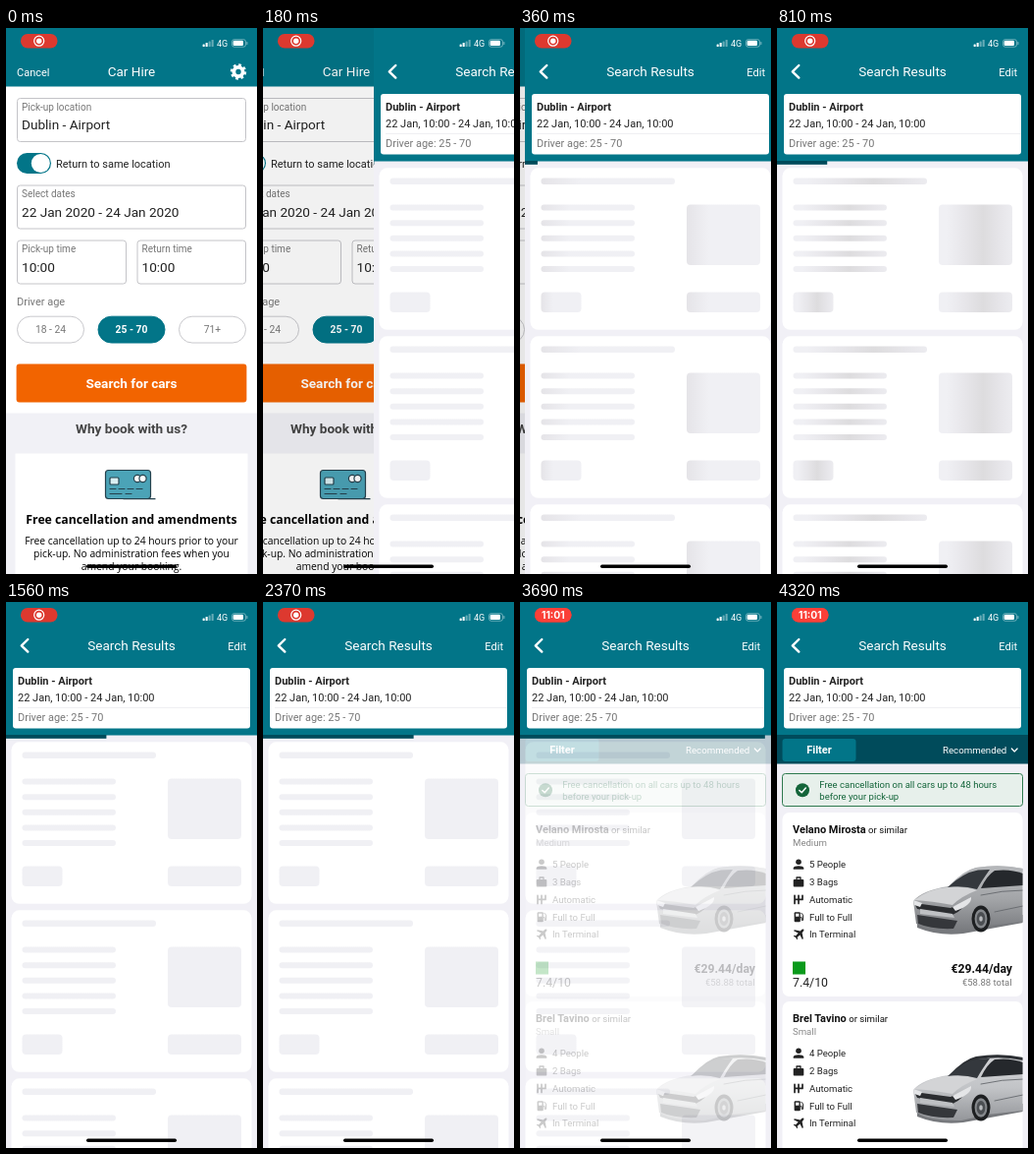
An HTML page for the animation above (4.35 s loop, 256x555 px).

```html
<!DOCTYPE html>
<html lang="en">
<head>
<meta charset="utf-8">
<title>Car hire search</title>
<style>
  html, body { margin: 0; width: 100%; height: 100%; overflow: hidden; background: #fff; }
  svg { display: block; width: 256px; height: 555px; }
  text { font-family: Roboto, Arial, sans-serif; white-space: pre; }
  .web { font-family: "Open Sans", "Noto Sans", sans-serif; }
  .clock { font-family: Inter, Arial, sans-serif; }
</style>
</head>
<body>
<svg id="stage" viewBox="0 0 256 555" xmlns="http://www.w3.org/2000/svg"></svg>
<script>
const LOOP = 4350;
const TEAL = '#027588', DEEP = '#004b5b', PAGE = '#f1f0f6', INK = '#222', GREY = '#777';

const rect = (x, y, w, h, fill, r = 0, more = '') =>
  `<rect x="${x}" y="${y}" width="${w}" height="${h}" rx="${r}" fill="${fill}" ${more}/>`;
const path = (d, fill, more = '') => `<path d="${d}" fill="${fill}" ${more}/>`;
const circle = (x, y, r, fill, more = '') =>
  `<circle cx="${x}" cy="${y}" r="${r}" fill="${fill}" ${more}/>`;
const line = (d, stroke, w) =>
  path(d, 'none', `stroke="${stroke}" stroke-width="${w}" stroke-linecap="round" stroke-linejoin="round"`);
const gradient = (id, stops, more = '') =>
  `<linearGradient id="${id}" ${more}>` +
  stops.map(([at, c]) => `<stop offset="${at}" stop-color="${c}"/>`).join('') + '</linearGradient>';

// y is the middle of the capitals
const text = (x, y, str, size, fill = INK, { bold, at = 'start', cls = '' } = {}) =>
  `<text x="${x}" y="${(y + size * 0.355).toFixed(2)}" font-size="${size}" fill="${fill}" class="${cls}"` +
  ` font-weight="${bold ? 700 : 400}" text-anchor="${at}">${str}</text>`;
const MID = { at: 'middle' }, BOLD = { bold: true }, MIDBOLD = { at: 'middle', bold: true };

function field(x, y, w, label, value) {
  return rect(x + .5, y + .5, w - 1, 44, '#fff', 3, 'stroke="#c4c4c8"') +
    text(x + 5, y + 9.3, label, 10, GREY) + text(x + 5, y + 27.5, value, 13.6);
}

function pill(x, label, on) {
  return rect(x + .5, 293.2, 68, 26.8, on ? TEAL : '#fff', 13.4, `stroke="${on ? TEAL : '#c8c8cc'}"`) +
    text(x + 34.5, 306.8, label, 10.3, on ? '#fff' : GREY, { at: 'middle', bold: on });
}

function gear(x, y) {
  return circle(x, y, 4.6, 'none', 'stroke="#fff" stroke-width="3.8"') +
    circle(x, y, 7, 'none', 'stroke="#fff" stroke-width="2.4" stroke-dasharray="2.749"');
}

function bankCard() {
  const edge = 'stroke="#25414d" stroke-width="1.2"';
  return rect(101.5, 449.5, 46, 29, '#4ba3b7', 3, edge) +
    rect(106, 457, 9, 7, '#d9eef2', 1, edge) +
    circle(134, 458, 3.6, '#fff', edge) + circle(139.5, 458, 3.6, '#fff', edge) +
    line('M106 468.5h6M115 468.5h6M124 468.5h6M133 468.5h6M106 473.5h12M122 473.5h6M120 478.7h32', '#25414d', 1.2);
}

function home() {
  return rect(0, 0, 256, 555, '#fff') + rect(0, 0, 256, 59.5, TEAL) +
    text(11, 44.9, 'Cancel', 11, '#fff') + text(128, 44.2, 'Car Hire', 13.5, '#fff', MID) + gear(237, 44.5) +
    field(11, 71, 234, 'Pick-up location', 'Dublin - Airport') +
    rect(11, 127, 35, 21, TEAL, 10.5) + circle(35.3, 137.5, 9.5, '#fff') +
    text(51, 138, 'Return to same location', 11) +
    field(11, 159.5, 234, 'Select dates', '22 Jan 2020 - 24 Jan 2020') +
    field(11, 215.5, 112, 'Pick-up time', '10:00') + field(133.5, 215.5, 111.5, 'Return time', '10:00') +
    text(11, 278.4, 'Driver age', 11, GREY) +
    pill(11, '18 - 24') + pill(93.5, '25 - 70', true) + pill(176, '71+') +
    rect(10.6, 341.5, 234.8, 39, '#f26400', 3) + text(128, 361.2, 'Search for cars', 13.6, '#fff', MIDBOLD) +
    rect(0, 391.5, 256, 164, '#f1f1f6') + text(128, 407.2, 'Why book with us?', 13.6, '#444', MIDBOLD) +
    rect(9.5, 432.5, 237, 130, '#fff') + bankCard() +
    text(128, 499.4, 'Free cancellation and amendments', 12.25, '#000', { at: 'middle', bold: true, cls: 'web' }) +
    ['Free cancellation up to 24 hours prior to your', 'pick-up. No administration fees when you', 'amend your booking.']
      .map((s, i) => text(128, 520.9 + 13 * i, s, 10.32, '#000', { at: 'middle', cls: 'web' })).join('');
}

function resultsHeader() {
  return rect(0, 0, 256, 135.5, TEAL) + line('M22.3 38L15.8 44.3L22.3 50.6', '#fff', 2.4) +
    text(128, 44.2, 'Search Results', 13.55, '#fff', MID) + text(245, 45.4, 'Edit', 11, '#fff', { at: 'end' }) +
    rect(7, 67, 242, 61.5, '#fff', 3) + rect(12, 107, 237, 1, '#efeff2') +
    text(12, 80.5, 'Dublin - Airport', 11, INK, BOLD) +
    text(12, 97.5, '22 Jan, 10:00 - 24 Jan, 10:00', 11) + text(12, 116.7, 'Driver age: 25 - 70', 10.95, GREY);
}

function skeleton(y) {
  const bone = (x, dy, w, h, r) => rect(x, y + dy, w, h, 'url(#shine)', r);
  return rect(5.5, y, 245, 164.5, '#fff', 8) + bone(16.5, 10.2, 136.5, 6.5, 3) +
    [0, 1, 2, 3, 4].map(i => bone(16.5, 37.3 + 15.6 * i, 95.5, 6, 3)).join('') +
    bone(165, 37.3, 75, 61.5, 4) + bone(16.5, 126.3, 41, 20.5, 4) + bone(165, 126.3, 75, 20.5, 4);
}

// Icons sit around (0, 0)
const ICONS = [
  circle(0, -2.6, 2.8, INK) + path('M-5.3 5V3.6C-5.3 .6 5.3 .6 5.3 3.6V5z', INK),
  rect(-5.3, -2.6, 10.6, 7.6, INK, 1) + line('M-2 -3V-4.6H2V-3', INK, 1.3),
  line('M-4 -4V4M0 -4V4M4 -4V0H-4', INK, 1.7),
  rect(-4.4, -5, 6.2, 10, INK, 1) + rect(-3, -3.5, 3.4, 3, '#fff') + line('M2 .5H3.2V3.2H4.6V-2L2.8 -4', INK, 1),
  path('M5.2 -5.2C4.4 -6 2.9 -4.8 1.8 -3.6L-4.2 -4.8L-5 -3.8L-.4 -1.4L-2.8 1.2L-4.6 1L-5.2 1.8L-2.9 2.9L-1.8 5.2L-1 4.6L-1.2 2.8L1.4 .4L3.8 5L4.8 4.2L3.6 -1.8C4.8 -2.9 6 -4.4 5.2 -5.2z', INK)
];

function wheel(x, y) {
  const oval = (rx, ry, fill) => `<ellipse cx="${x}" cy="${y}" rx="${rx}" ry="${ry}" fill="${fill}"/>`;
  return oval(9.5, 13.5, '#1d1f21') + oval(6.4, 9.8, '#85888c') + oval(4.4, 7, '#4b4e52') + oval(1.8, 2.8, '#b9bbbe');
}

function car(y, roof, side) {
  return `<g transform="translate(0 ${y})" clip-path="url(#carEdge)">` +
    path('M143 331Q165 340 190 337L251 326V318H143z', '#77797d') +
    path('M139 304Q148 293 175 289Q190 273 203 270Q228 266 251 271V325L215 329L188 335Q158 336 142 327z', side) +
    path('M176 289Q190 273 203 270Q228 266 251 271V274Q228 269 205 273z', roof) +
    path('M174 290Q190 275 205 272.5L217 272Q209 283 204 292Q190 288 174 290z', '#34383d') +
    path('M208 291Q214 278 222 273Q238 271 251 276V288z', '#25282c') +
    path('M140 303Q156 291 174 290Q192 289 204 293Q188 299 179 308Q158 304 140 303z', '#d3d4d6') +
    path('M140 306L177 311L191 305Q191 313 179 318L143 312z', '#2b2d30') +
    path('M179 310L198 300Q199 308 182 314zM139 303L148 306L146 310L140 308z', '#e4e5e7') +
    path('M143 318L184 324L180 332Q158 333 144 327z', '#35373b') +
    path('M146 312L179 317L181 321L146 317z', '#bfc1c4') +
    line('M208 298Q230 293 251 293M222 315L251 309', '#66696e', .9) +
    wheel(208, 322) + '</g>';
}

function offer(y, name, kind, people, bags, roof, side) {
  const rows = [people + ' People', bags + ' Bags', 'Automatic', 'Full to Full', 'In Terminal'];
  return rect(5.5, y, 245, 187, '#fff', 7) + car(y - 214, roof, side) +
    `<text x="16" y="${y + 20.8}" font-size="11" font-weight="700" fill="#111">${name}` +
    `<tspan font-size="9.6" font-weight="400"> or similar</tspan></text>` +
    text(16, y + 30.3, kind, 9.6, '#888') +
    rows.map((s, i) => {
      const cy = y + 52.8 + 17.8 * i;
      return `<g transform="translate(22 ${cy})">${ICONS[i]}</g>` + text(33, cy, s, 9.6);
    }).join('') +
    rect(16, y + 151.5, 13, 13, '#0a9a1c') + text(16, y + 173, '7.4/10', 12.3) +
    text(240, y + 159, '€29.44/day', 12.2, '#111', { bold: true, at: 'end' }) +
    text(239.5, y + 173, '€58.88 total', 9.5, GREY, { at: 'end' });
}

function offers() {
  const GREEN = '#14653a';
  return rect(0, 135, 256, 420, PAGE) + rect(0, 135, 256, 29.5, DEEP) +
    rect(5.5, 139, 75, 23, TEAL, 3) + text(43, 150.3, 'Filter', 11, '#fff', MIDBOLD) +
    text(169, 150.3, 'Recommended', 9.7, '#fff') + line('M239.3 149L242.2 152L245.1 149', '#fff', 1.2) +
    rect(5.5, 174.5, 245, 33, '#e7f0eb', 3, 'stroke="#2f7a4f"') +
    circle(26, 191.2, 7, GREEN) + line('M22.8 191.5L25.2 193.8L29.3 189.1', '#fff', 1.5) +
    text(43.3, 185.8, 'Free cancellation on all cars up to 48 hours', 9.5, GREEN) +
    text(43.3, 197.2, 'before your pick-up', 9.5, GREEN) +
    offer(214, 'Velano Mirosta', 'Medium', 5, 3, '#b4b6b9', 'url(#silver)') +
    offer(406, 'Brel Tavino', 'Small', 4, 2, '#2d3034', 'url(#white)');
}

function statusBar() {
  const badge = fill => rect(15, 6, 37.5, 14.5, fill, 7);
  return badge('#dd392f') +
    `<g id="rec">${circle(33.7, 13.2, 5, 'none', 'stroke="#fff" stroke-width="1.2"')}${circle(33.7, 13.2, 2.7, '#fff')}</g>` +
    `<g id="clock">${badge('#fa4038')}${text(33.8, 13.2, '11:01', 10.3, '#fff', { at: 'middle', bold: true, cls: 'clock' })}</g>` +
    [0, 1, 2, 3].map(i => rect(200.6 + 3 * i, 16.5 - 1.5 * i, 2.1, 2.5 + 1.5 * i, '#fff', .6, `opacity="${i < 2 ? 1 : .4}"`)).join('') +
    text(215, 15.6, '4G', 9, '#fff') +
    rect(230.5, 11.7, 14, 7.5, 'none', 2.2, 'stroke="#fff" stroke-opacity=".5" stroke-width=".8"') +
    rect(231.6, 12.8, 10.4, 5.3, '#fff', 1.3) + rect(245.4, 14.1, 1, 2.8, '#fff', .5, 'opacity=".5"');
}

const DOWN = 'x2="0" y2="1"';
document.getElementById('stage').innerHTML =
  '<defs>' +
  gradient('shine', [[0, '#f0f0f4'], [.25, '#e7e6ea'], [.5, '#dddcde'], [.75, '#e7e6ea'], [1, '#f0f0f4']]) +
  gradient('silver', [[0, '#b9bbbe'], [.5, '#a3a5a8'], [1, '#77797d']], DOWN) +
  gradient('white', [[0, '#d2d3d6'], [.5, '#c2c4c7'], [1, '#94969a']], DOWN) +
  '<clipPath id="carEdge"><rect x="125" y="260" width="125.5" height="85"/></clipPath></defs>' +
  `<g id="home">${home()}</g>` + rect(0, 0, 256, 555, '#000', 0, 'id="dim"') +
  `<g id="results">${rect(0, 0, 256, 555, PAGE)}${[142.3, 313.3, 484.3].map(skeleton).join('')}` +
  `${resultsHeader()}${rect(0, 135, 256, 3.8, DEEP, 0, 'id="bar"')}<g id="offers">${offers()}</g></g>` +
  statusBar() + rect(82, 545.6, 92, 3.4, '#000', 1.7);

const el = {};
for (const id of ['home', 'dim', 'results', 'shine', 'bar', 'offers', 'rec', 'clock'])
  el[id] = document.getElementById(id);

const clamp = v => Math.min(1, Math.max(0, v));
const smooth = v => v * v * (3 - 2 * v);
const slide = (node, x) => node.setAttribute('transform', `translate(${Math.round(x)} 0)`);

// Critically damped spring
function push(t) {
  const x = Math.max(0, t - 96) * 0.0221;
  return t > 600 ? 1 : 1 - Math.exp(-x) * (1 + x);
}

// The bar grows by a twentieth every 183 ms, with a short rest after each step
function progress(t) {
  const n = (t + 10) / 183, step = Math.floor(n);
  if (step < 1) return 0;
  return Math.min(1, (step - 1 + smooth(clamp((n - step) * 183 / 80))) / 20);
}

function draw(t) {
  const p = push(t);
  slide(el.home, -76.8 * p);
  slide(el.results, 256 * (1 - p));
  el.dim.setAttribute('opacity', 0.1 * p);

  const mid = -0.2 + (t - 360) * 0.00178;
  el.shine.setAttribute('x1', mid - 0.5);
  el.shine.setAttribute('x2', mid + 0.5);

  el.bar.setAttribute('width', 256 * progress(t));
  el.offers.setAttribute('opacity', clamp((t - 3670) / 90));

  const swap = clamp((t - 2400) / 150);
  el.rec.setAttribute('opacity', 1 - swap);
  el.clock.setAttribute('opacity', swap);
}

const start = performance.now();
function tick() {
  draw((performance.now() - start) % LOOP);
  requestAnimationFrame(tick);
}
draw(0);
requestAnimationFrame(tick);
</script>
</body>
</html>
```
